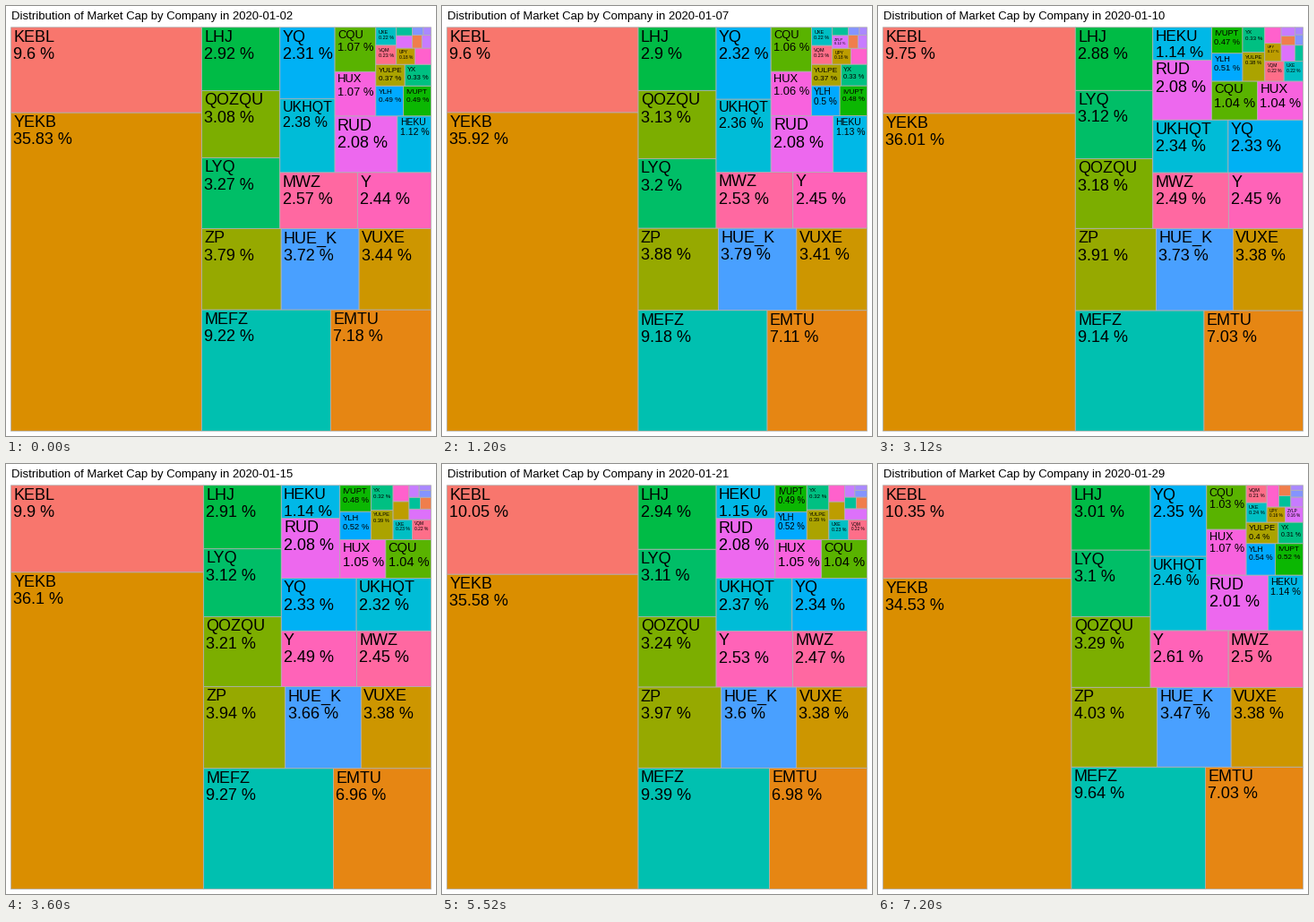
These frames come from a looping animation (480 px wide and 480 px high, 8 s). A matplotlib script:

```python
import numpy as np
import matplotlib.pyplot as plt
from matplotlib.animation import FuncAnimation
from matplotlib.patches import Rectangle
from matplotlib.textpath import TextPath

SIZE, DPI = 480, 80
PT = 72 / DPI                      # points per pixel
FONT = "Liberation Sans"
LEFT, RIGHT, TOP, BOTTOM = 5.5, 474.5, 23.8, 474.5
PAD = 2.83                         # label padding, 1 mm
MAX_TEXT, MIN_TEXT = 18, 4
CAP, LEADING = 0.72, 1.08          # in units of the text size
EDGE, EDGE_WIDTH = "#b0b0b0", 0.8
STEPS, FRAMES_PER_STEP = 7, 3


def trend(first, last=None, turn=None):
    """Straight drift from first to last, bent at an optional (step, value)."""
    end = (STEPS - 1, first if last is None else last)
    points = [(0, first), turn, end] if turn else [(0, first), end]
    return np.interp(range(STEPS), *zip(*points))


# Share in percent, in palette order; a leading underscore means no label
SHARES = {
    "KEBL": trend(9.6, 10.35, (1, 9.6)),
    "_a": trend(0.074),
    "EMTU": trend(7.18, 7.03, (3, 6.96)),
    "YEKB": trend(35.83, 34.53, (3, 36.1)),
    "VUXE": trend(3.44, 3.38, (2, 3.38)),
    "UPY": trend(0.18, 0.164),
    "YULPE": trend(0.368, 0.402),
    "ZP": trend(3.79, 4.03, (1, 3.88)),
    "QOZQU": trend(3.08, 3.29, (2, 3.18)),
    "CQU": trend(1.07, 1.03, (2, 1.04)),
    "IVUPT": trend(0.49, 0.52, (2, 0.47)),
    "LHJ": trend(2.92, 3.01, (2, 2.88)),
    "LYQ": trend(3.27, 3.1, (2, 3.12)),
    "YX": trend(0.333, 0.31),
    "_b": trend(0.078),
    "MEFZ": trend(9.22, 9.64, (2, 9.14)),
    "UXE": trend(0.216, 0.24),
    "UKHQT": trend(2.38, 2.46, (3, 2.32)),
    "HEKU": trend(1.12, 1.14, (5, 1.16)),
    "YQ": trend(2.315, 2.35),
    "YLH": trend(0.491, 0.54),
    "HUE_K": trend(3.72, 3.47, (1, 3.79)),
    "_c": trend(0.05),
    "_d": trend(0.035),
    "_e": trend(0.071),
    "ZYLP": trend(0.118, 0.162, (2, 0.13)),
    "RUD": trend(2.08, 2.01, (5, 2.08)),
    "HUX": trend(1.072, 1.07, (2, 1.039)),
    "_f": trend(0.153),
    "Y": trend(2.44, 2.61, (2, 2.45)),
    "MWZ": trend(2.57, 2.5, (3, 2.45)),
    "VQM": trend(0.232, 0.21),
}


def hcl(hue, chroma=100, lum=65):
    """Polar LUV colour as clipped sRGB."""
    a = np.radians(hue)
    y = ((lum + 16) / 116) ** 3
    u = chroma * np.cos(a) / (13 * lum) + 0.1978
    v = chroma * np.sin(a) / (13 * lum) + 0.4683
    x = 9 * y * u / (4 * v)
    z = -x / 3 - 5 * y + 3 * y / v
    m = np.array([[3.240479, -1.53715, -0.498535],
                  [-0.969256, 1.875992, 0.041556],
                  [0.055648, -0.204043, 1.057311]])
    rgb = np.clip(m @ [x, y, z], 0, 1)
    return tuple(np.where(rgb > 0.00304, 1.055 * rgb ** (1 / 2.4) - 0.055, 12.92 * rgb))


COLORS = {n: hcl(15 + 360 * i / len(SHARES)) for i, n in enumerate(SHARES)}


def date(step):
    """Every third trading day."""
    return np.busday_offset("2020-01-02", 3 * step, holidays=["2020-01-20"])


def worst(areas, side):
    """Worst aspect ratio when the areas share one strip along a side."""
    depth = sum(areas) / side
    return max(max(depth * depth / a, a / (depth * depth)) for a in areas)


def squarify(items):
    """Yield (name, x, y, w, h) in a unit square, filled from the bottom left."""
    total = sum(v for _, v in items)
    items = [(n, v / total) for n, v in items]
    x, y, w, h = 0.0, 0.0, 1.0, 1.0
    while items:
        wide = w >= h
        side = h if wide else w
        areas = [v for _, v in items]
        k = 1
        while k < len(items) and worst(areas[:k + 1], side) <= worst(areas[:k], side):
            k += 1
        depth, pos = sum(areas[:k]) / side, 0.0
        for name, a in items[:k]:
            length = a / depth
            if wide:
                yield name, x, y + pos, depth, length
            else:
                yield name, x + pos, y, length, depth
            pos += length
        if wide:
            x, w = x + depth, w - depth
        else:
            y, h = y + depth, h - depth
        items = items[k:]


def text_width(s):
    """Width per unit of text size, side bearings included."""
    path = TextPath((0, 0), s, size=100, prop={"family": FONT})
    return path.get_extents().width / 100 + 0.07


def fit(lines, w, h):
    across = (w - 2 * PAD) / max(text_width(s) for s in lines)
    down = (h - 2 * PAD) / (CAP + LEADING)
    return min(MAX_TEXT, across, down)


def write(x, y, s, px):
    ax.text(x, y, s, size=px * PT, family=FONT, color="black",
            ha="left", va="baseline", zorder=3)


def draw_tile(name, value, x, y, w, h):
    ax.add_patch(Rectangle((x, y), w, h, facecolor=COLORS[name], edgecolor=EDGE,
                           lw=EDGE_WIDTH * PT, snap=False))
    if name.startswith("_"):
        return
    lines = [name, f"{round(value, 2):g} %"]
    px = fit(lines, w, h)
    if px < MIN_TEXT:
        return
    for i, s in enumerate(lines):
        write(x + PAD, y + PAD + px * (CAP + i * LEADING), s, px)


def draw(frame):
    step = frame // FRAMES_PER_STEP
    for artist in list(ax.patches) + list(ax.texts):
        artist.remove()
    write(LEFT, 15, f"Distribution of Market Cap by Company in {date(step)}", 13.1)
    values = {n: float(v[step]) for n, v in SHARES.items()}
    ranked = sorted(values.items(), key=lambda kv: -kv[1])
    sx, sy = RIGHT - LEFT, BOTTOM - TOP
    for name, x, y, w, h in squarify(ranked):
        draw_tile(name, values[name], LEFT + x * sx, BOTTOM - (y + h) * sy, w * sx, h * sy)
    return []


fig = plt.figure(figsize=(SIZE / DPI, SIZE / DPI), dpi=DPI, facecolor="white")
ax = fig.add_axes([0, 0, 1, 1])
ax.set_xlim(0, SIZE)
ax.set_ylim(SIZE, 0)
ax.axis("off")

anim = FuncAnimation(fig, draw, frames=20, interval=400, init_func=lambda: [],
                     repeat=True, repeat_delay=0, blit=False)
plt.show()
```
